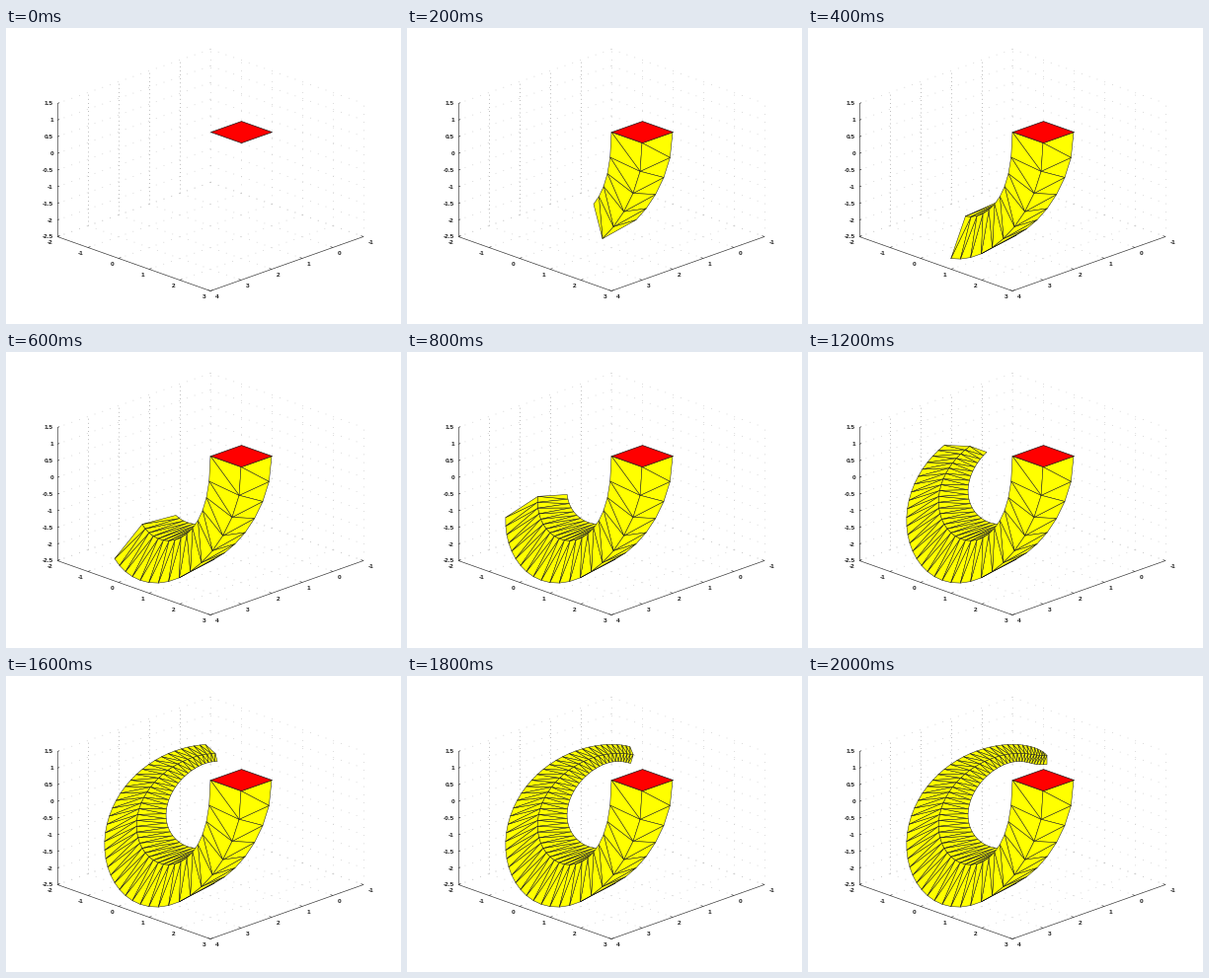
A matplotlib script for the animation above (3000 ms loop, 400 px wide and 300 px high).

```python
import numpy as np
import matplotlib.pyplot as plt
from matplotlib.animation import FuncAnimation
from matplotlib.collections import LineCollection, PolyCollection

W, H, DPI = 400, 300, 100
PX = 72 / DPI            # points per pixel
INK = "#1c1c1c"
STEPS, SLICES, FRAMES = 10, 5, 15

plt.rcParams["font.family"] = "Liberation Sans"

fig = plt.figure(figsize=(W / DPI, H / DPI), dpi=DPI, facecolor="white")
ax = fig.add_axes([0, 0, 1, 1])
ax.set_xlim(0, W)
ax.set_ylim(H - 0.5, -0.5)
ax.axis("off")


def project(x, y, z):
    return 238 + 31 * (x - y), 104.6 + 11 * (x + y) - 33.75 * z


# ---- box: dotted grid, axes, ticks and labels ----
X0, X1, Y0, Y1, Z0, Z1 = -2, 3, -1, 4, -2.5, 1.5
xs, ys, zs = np.arange(X0, X1 + 1), np.arange(Y0, Y1 + 1), np.arange(Z0, Z1 + 0.1, 0.5)


def seg(a, b):
    return [project(*a), project(*b)]


def dotted(lines, color, gap):
    ax.add_collection(LineCollection(lines, colors=color, linewidths=0.75 * PX,
                                     linestyles=[(0, (1, gap))], zorder=1))


dotted([seg((X0, y, Z0), (X0, y, Z1)) for y in ys[1:-1]], "#8c8c8c", 4.5)
dotted([seg((x, Y0, Z0), (x, Y0, Z1)) for x in xs]
       + [seg((X0, Y0, z), (X0, Y1, z)) for z in zs]
       + [seg((X0, Y0, z), (X1, Y0, z)) for z in zs]
       + [seg((x, Y0, Z0), (x, Y1, Z0)) for x in xs]
       + [seg((X0, y, Z0), (X1, y, Z0)) for y in ys], "#c4c4c4", 10)

edges = [seg((X0, Y1, Z0), (X0, Y1, Z1)),
         seg((X0, Y1, Z0), (X1, Y1, Z0)),
         seg((X1, Y1, Z0), (X1, Y0, Z0))]
edges += [seg((x, Y1, Z0), (x, Y1 - 0.08, Z0)) for x in xs]
edges += [seg((X1, y, Z0), (X1 - 0.08, y, Z0)) for y in ys]
edges += [seg((X0, Y1, z), (X0, Y1 - 0.07, z)) for z in zs]
ax.add_collection(LineCollection(edges, colors="#333333", linewidths=0.65 * PX, zorder=2))


def label(x, y, value, ha):
    ax.text(x, y, f"{value:g}", ha=ha, va="center_baseline",
            fontsize=6.5 * PX, weight="bold", color=INK)


for x in xs:
    px, py = project(x, Y1, Z0)
    label(px - 4.5, py + 5.5, x, "right")
for y in ys:
    px, py = project(X1, y, Z0)
    label(px + 5, py + 5.5, y, "left")
for z in zs:
    px, py = project(X0, Y1, z)
    label(px - 4, py, z, "right")


# ---- swept tube: smooth corner paths through a few key points ----
KEYS = [0, 2, 5, 15, 30, 40, 50]
PATH_A = [(207, 105), (203, 147), (189, 178), (138, 174), (164, 95), (212, 78), (242, 80)]
PATH_B = [(238, 116), (229, 167), (198, 213), (110, 209), (138, 94), (202, 69), (240, 78)]
PATH_D = [(238, 94), (234, 131), (223, 159), (172, 165), (181, 101), (214, 86), (242, 89)]


def ease(n):
    """Slices start long and get shorter; scaled to -1..1."""
    return 2 * (np.asarray(n) / (STEPS * SLICES)) ** 0.75 - 1


def trail(points):
    powers = range(len(KEYS))
    basis = [[t ** p for p in powers] for t in ease(KEYS)]
    coef = np.linalg.solve(basis, points)
    return np.array([[t ** p for p in powers]
                     for t in ease(np.arange(STEPS * SLICES + 1))]) @ coef


A, B, D = map(trail, (PATH_A, PATH_B, PATH_D))
ring = [A, B, B + D - A, D]


def cross(u, v):
    return u[0] * v[1] - u[1] * v[0]


def strip(i):
    """Triangles of the faces of slice i that look towards the viewer."""
    tris = []
    for j in range(4):
        p, q = ring[j], ring[(j + 1) % 4]
        for tri in ([p[i], q[i], q[i + 1]], [p[i], q[i + 1], p[i + 1]]):
            if cross(tri[1] - tri[0], tri[2] - tri[0]) > 0:
                tris.append(tri)
    return tris


strips = [strip(i) for i in range(STEPS * SLICES)]

tube = PolyCollection([], facecolors="#ffff00", edgecolors=INK,
                      linewidths=0.5 * PX, joinstyle="round", zorder=3)
ax.add_collection(tube)

square = [project(x, y, 0) for x, y in ((-.5, .5), (.5, .5), (.5, -.5), (-.5, -.5))]
ax.add_collection(PolyCollection([square], facecolors="#ff0000", edgecolors=INK,
                                 linewidths=0.7 * PX, joinstyle="round", zorder=4))


def draw(frame):
    count = SLICES * min(frame, STEPS)
    # the start of the tube is nearest, so paint it last
    tube.set_verts([t for s in reversed(strips[:count]) for t in s])
    return [tube]


anim = FuncAnimation(fig, draw, frames=FRAMES, interval=200, repeat=True,
                     repeat_delay=0, blit=False)
plt.show()
```
